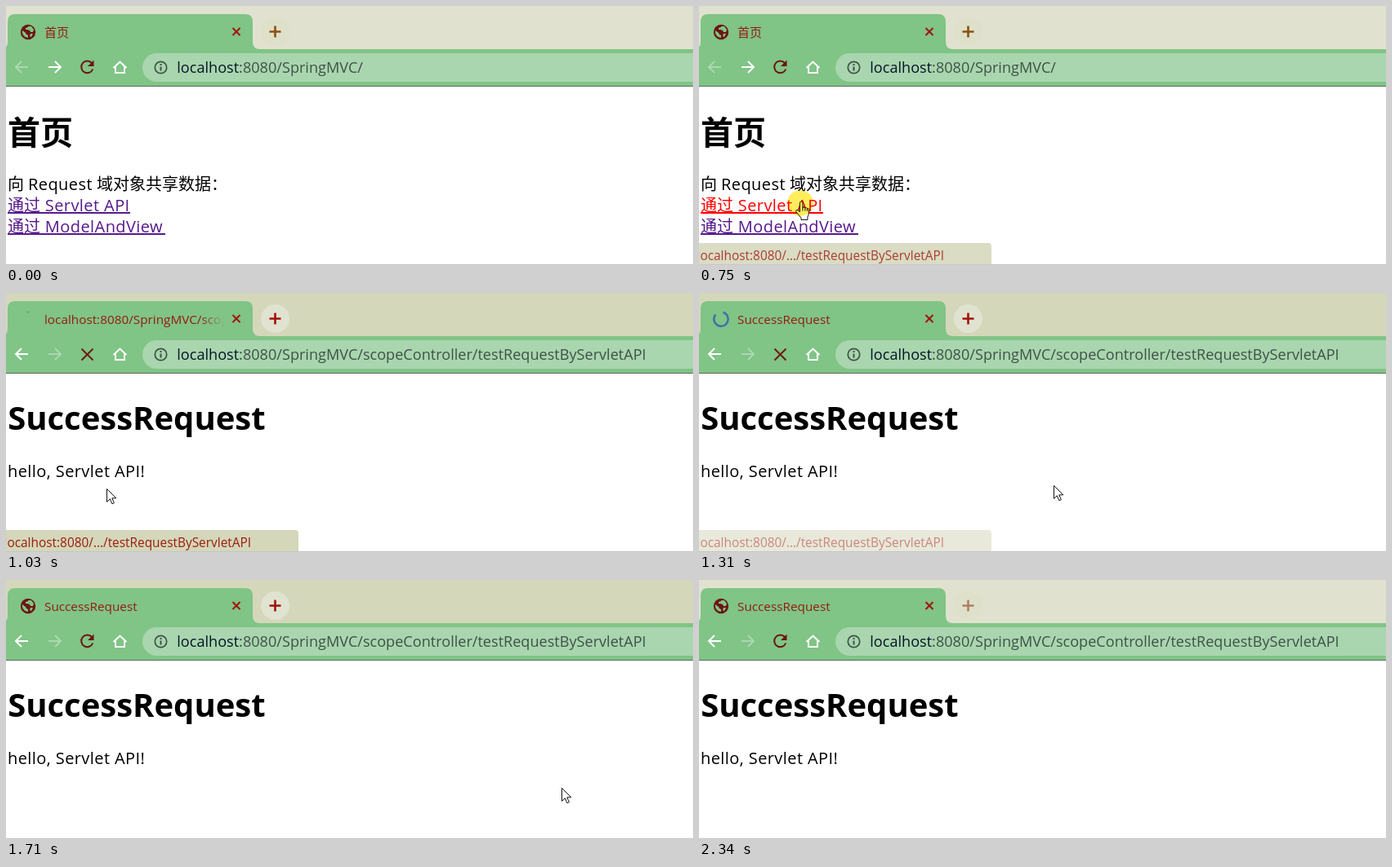
These frames come from a looping animation (841 by 318 pixels, 2410 ms). An HTML page:

```html
<!DOCTYPE html>
<html lang="zh-CN">
<head>
<meta charset="utf-8">
<title>首页</title>
<style>
  html, body { margin: 0; width: 100%; height: 100%; overflow: hidden; background: #fff; }
  svg { display: block; width: 841px; height: 318px; }
  text { font-family: "Open Sans", "Noto Sans", sans-serif; white-space: pre; }
  .cjk { font-family: "Noto Sans CJK SC", "Noto Sans CJK", sans-serif; }
  .h1 { font-size: 40px; font-weight: 700; }
  .body { font-size: 20px; letter-spacing: .42px; }
  .body.cjk { letter-spacing: 0; }
  .tab { font-size: 15.3px; fill: url(#fade); }
  .tab.cjk { font-size: 15px; }
  .url { font-size: 18.1px; fill: #3f5149; }
  .line { fill: none; stroke-width: 2; }
</style>
</head>
<body>
<svg viewBox="0 0 841 318">
  <defs>
    <linearGradient id="fade" gradientUnits="userSpaceOnUse" x1="238" x2="267" y1="0" y2="0">
      <stop offset="0" stop-color="#941a10"/>
      <stop offset="1" stop-color="#941a10" stop-opacity="0"/>
    </linearGradient>
  </defs>

  <rect width="841" height="318" fill="#fff"/>
  <rect id="bar" width="841" height="53"/>

  <!-- tab strip -->
  <path d="M-7 53Q2 53 2 44V19Q2 10 11 10H293Q302 10 302 19V44Q302 53 311 53Z" fill="#80c486"/>
  <g id="globe">
    <circle cx="27" cy="32" r="9.2" fill="#6b1512"/>
    <path d="M20 30l4 3 1 2 2 1v3q-6-1-7-6zM27 25l4 0 3 4-1 3-3 0-1-2-3-1-2 0 0-2 3-1zM30 34l3 0-2 4-2-1z" fill="#80c486"/>
  </g>
  <path id="spin" class="line" style="stroke-width:2.5"/>
  <text id="tabHome" class="tab cjk" x="47" y="37.5">首页</text>
  <text id="tabUrl" class="tab" x="47" y="38">localhost:8080/SpringMVC/scopeController</text>
  <text id="tabDone" class="tab" x="47" y="38">SuccessRequest</text>
  <path class="line" stroke="#a0120c" d="M277.5 27l9 9M286.5 27l-9 9"/>
  <circle id="plusBg" cx="329.5" cy="31.5" r="17.5"/>
  <path id="plus" class="line" style="stroke-width:2.6" d="M322.5 31.5h14M329.5 24.5v14"/>

  <!-- toolbar -->
  <rect y="53" width="841" height="45" fill="#80c486"/>
  <rect x="167" y="58" width="720" height="35" rx="17.5" fill="#a9d6ae"/>
  <path id="back" class="line" stroke="#fff" d="M27 75H12M19 68l-7 7 7 7"/>
  <path id="next" class="line" stroke="#fff" d="M52 75H67M60 68l7 7-7 7"/>
  <g id="reload">
    <path class="line" stroke="#6b1512" d="M105 70A7.3 7.3 0 1 0 106.3 77.5"/>
    <path d="M107.5 66.5v7.5h-7.5z" fill="#6b1512"/>
  </g>
  <path id="stop" class="line" stroke="#6b1d12" d="M92.5 68.5l14 14M106.5 68.5l-14 14"/>
  <path class="line" stroke="#fff" d="M131.5 76L139.5 68.5L147.5 76M134 74V82H145V74"/>
  <g stroke="#3f5149" class="line">
    <circle cx="189.5" cy="75.5" r="7.2" style="stroke-width:1.7"/>
    <path d="M189.5 74.5v5M189.5 71v2"/>
  </g>
  <text class="url" x="209.3" y="82"><tspan fill="#06142a">localhost</tspan>:8080/SpringMVC/<tspan id="urlTail">scopeController/testRequestByServletAPI</tspan></text>
  <rect y="98" width="841" height="1" fill="#5d6b5f"/>

  <!-- first page -->
  <g id="home">
    <text class="h1 cjk" x="2" y="169.5">首页</text>
    <text class="body cjk" x="2" y="226">向</text>
    <text class="body" x="27" y="226">Request</text>
    <text class="body cjk" x="111" y="226">域对象共享数据：</text>
    <g id="link">
      <text class="body cjk" x="2" y="252">通过</text>
      <text class="body" x="47.8" y="252">Servlet API</text>
      <rect x="2" y="253" width="150" height="2"/>
    </g>
    <g fill="#551a8b">
      <text class="body cjk" x="2" y="278">通过</text>
      <text class="body" x="47.8" y="278">ModelAndView</text>
      <rect x="2" y="279" width="193" height="2"/>
    </g>
  </g>

  <!-- second page -->
  <g id="result">
    <text class="h1" x="2.2" y="168">SuccessRequest</text>
    <text class="body" x="2" y="226">hello, Servlet API!</text>
  </g>

  <g id="status">
    <path d="M0 291H354Q358 291 358 295V318H0Z" fill="#d4d7ba"/>
    <text x="-2.5" y="312" font-size="15.4" fill="#9c1c0e">localhost:8080/…/testRequestByServletAPI</text>
  </g>
  <rect y="317" width="841" height="1" fill="#c6c6c6"/>

  <g id="cursor" fill="#fff" stroke="#111" stroke-width="1" stroke-linejoin="round">
    <path id="arrow" d="M.5.5V16.5l3.8-3.6 2.6 6 2.5-1.1-2.6-5.9h5z"/>
    <g id="hand">
      <path d="M5.5 13V2.7a1.7 1.7 0 0 1 3.4 0V8.6q1.7-1.3 3 .3 1.6-1 2.5.5 2-.5 2 1.5V15q0 2.5-1.5 5V23.5H7V21.2Q4.5 18 .9 13.6.2 11.8 1.8 11.4 3.6 11.3 5.5 14Z"/>
      <path fill="none" d="M8.9 8.6v4M11.9 9v3.6M14.4 9.6v3.2"/>
    </g>
  </g>
  <circle id="click" cx="124" cy="242" r="15.8" fill="#ffee5c" style="mix-blend-mode:multiply"/>
</svg>
<script>
  const LOOP = 2410;
  const $ = id => document.getElementById(id);
  const show = (id, on) => $(id).style.display = on ? '' : 'none';
  const set = (id, name, value) => $(id).setAttribute(name, value);

  // time, x, y, shape
  const moves = [
    [0, 0, 0, ''],
    [70, 444, 297, 'arrow'], [140, 362, 286, 'arrow'], [210, 275, 273, 'arrow'],
    [270, 204, 262, 'arrow'], [340, 156, 252, 'hand'], [410, 130, 245, 'hand'],
    [480, 118, 239, 'hand'],
    [960, 123, 240, 'arrow'], [1170, 145, 242, 'arrow'], [1240, 280, 243, 'arrow'],
    [1310, 434, 236, 'arrow'], [1380, 550, 218, 'arrow'], [1440, 609, 205, 'arrow'],
    [1710, 680, 255, 'arrow'], [1780, 733, 271, 'arrow'], [1850, 772, 284, 'arrow'],
    [1920, 796, 294, 'arrow'], [1990, 805, 304, 'arrow'],
    [2070, 0, 0, '']
  ];
  // time, opacity
  const statusFade = [[0, 0], [680, .4], [750, .85], [820, 1], [1240, .8], [1310, .53], [1380, .2], [1440, 0]];

  const at = (steps, t) => steps.findLast(s => s[0] <= t);

  function arc(cx, cy, r, from, sweep) {
    const p = a => `${cx + r * Math.sin(a)} ${cy - r * Math.cos(a)}`;
    return `M${p(from)}A${r} ${r} 0 ${sweep > Math.PI ? 1 : 0} 1 ${p(from + sweep)}`;
  }

  function draw(t) {
    const between = (a, b) => t >= a && t < b;
    const active = between(820, 2340);
    const moved = t >= 960;
    const loading = between(960, 1440);

    set('bar', 'fill', active ? '#d4d7ba' : '#e0e2cf');
    set('plusBg', 'fill', active ? '#e0e3d0' : '#dfe0ca');
    set('plus', 'stroke', active ? '#a0120c' : t >= 2340 ? '#b07e62' : '#8a5010');

    show('globe', !loading);
    show('reload', !between(890, 1440));
    show('stop', between(890, 1440));
    show('spin', loading);
    const early = t < 1170;
    set('spin', 'd', early
      ? arc(27, 32, 8.5, -.2, .3 + Math.max(0, t - 1030) / 90)
      : arc(27, 32, 8.7, .3 + Math.floor((t - 1310) / 70) * .45, 5.1));
    set('spin', 'stroke', early ? '#6aae72' : '#3f73a8');

    show('tabHome', !moved);
    show('tabUrl', between(960, 1100));
    show('tabDone', t >= 1100);
    show('urlTail', moved);
    set('back', 'opacity', moved ? 1 : .35);
    set('next', 'opacity', moved ? .35 : 1);

    show('home', !moved);
    show('result', moved);
    set('link', 'fill', between(680, 960) ? '#f00' : '#551a8b');
    set('status', 'opacity', at(statusFade, t)[1]);
    show('click', between(680, 890));

    const [, x, y, shape] = at(moves, t);
    set('cursor', 'transform', `translate(${x} ${y})`);
    show('arrow', shape === 'arrow');
    show('hand', shape === 'hand');
  }

  const start = performance.now();
  function tick() {
    draw((performance.now() - start) % LOOP);
    requestAnimationFrame(tick);
  }
  tick();
</script>
</body>
</html>
```
